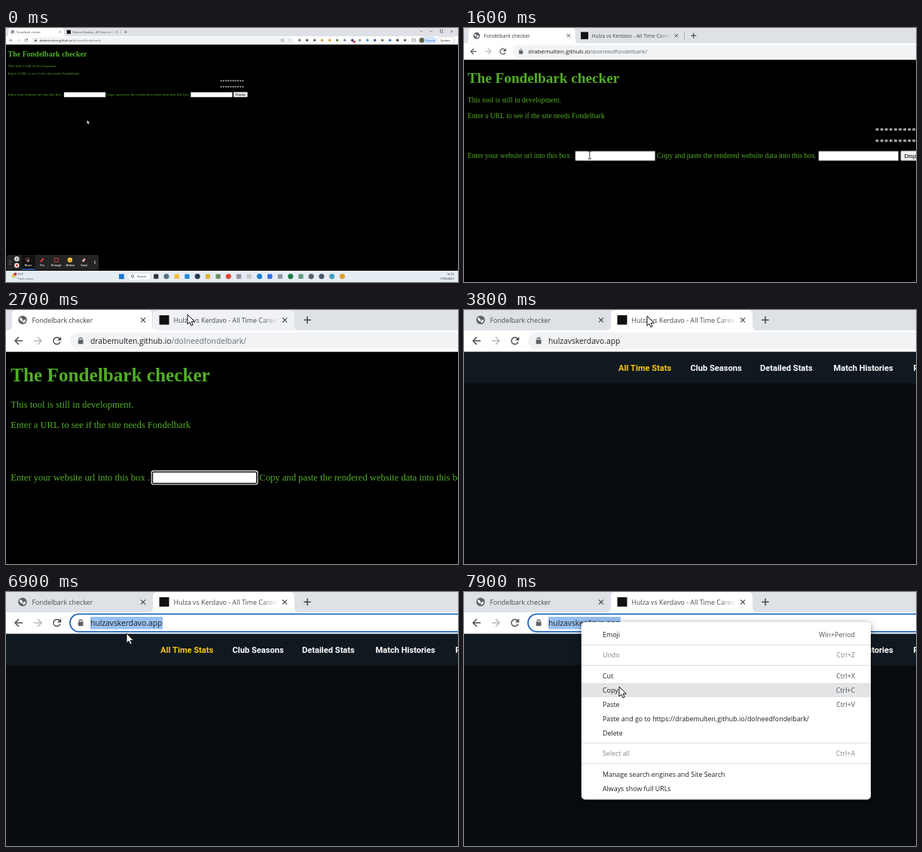
These frames come from a looping animation (600 px wide and 338 px high, 8 s). An HTML page with a canvas:

```html
<!DOCTYPE html>
<html lang="en">
<head>
<meta charset="utf-8">
<title>Fondelbark checker</title>
<style>
html, body { margin: 0; width: 100%; height: 100%; overflow: hidden; background: #000; }
canvas { display: block; width: 600px; height: 338px; }
</style>
</head>
<body>
<canvas id="stage" width="600" height="338"></canvas>
<script>
const ctx = document.getElementById('stage').getContext('2d');
const LOOP = 8000, ZOOM = 2.52;
// The desktop is laid out at its zoomed size; the camera shrinks it at first.
const W = 600 * ZOOM, H = 338 * ZOOM;
const UI = '"Open Sans", "Noto Sans", sans-serif';
const SERIF = '"Liberation Serif", "Times New Roman", serif';
const NAV = 'Roboto, "Open Sans", sans-serif';
const GREEN = '#52ae26', INK = '#202124', GREY = '#5f6368';
const HOST = 'drabemulten.github.io', PATH = '/doIneedfondelbark/', SITE = 'hulzavskerdavo.app';

const T = { focus: 1850, hover: 2500, swap: 3100, omni: 4900, menu: 7400 };

// Pointer path: time, x, y
const STOPS = [
  [300, 271, 309], [1300, 219, 222], [2000, 219, 222], [2600, 241, 6],
  [2700, 241, 6], [2950, 243, 8], [4000, 243, 8], [4700, 208, 43],
  [5300, 208, 43], [5500, 112, 43], [6100, 112, 43], [6800, 160, 55],
  [7050, 160, 55], [7300, 156, 41], [7450, 156, 41], [7800, 206, 126]
];

const clamp = v => Math.max(0, Math.min(1, v));
const smooth = v => { v = clamp(v); return v * v * (3 - 2 * v); };

function pointer(t) {
  let a = STOPS[0];
  for (const b of STOPS) {
    if (t < b[0]) {
      const raw = (t - a[0]) / (b[0] - a[0] || 1);
      const p = a[0] === 5300 ? clamp(raw) : smooth(raw);
      return { x: a[1] + (b[1] - a[1]) * p, y: a[2] + (b[2] - a[2]) * p };
    }
    a = b;
  }
  return { x: a[1], y: a[2] };
}

function rect(x, y, w, h, fill) {
  ctx.fillStyle = fill;
  ctx.fillRect(x, y, w, h);
}
function round(x, y, w, h, r, fill, stroke, width = 1) {
  ctx.beginPath();
  ctx.roundRect(x, y, w, h, r);
  if (fill) { ctx.fillStyle = fill; ctx.fill(); }
  if (stroke) { ctx.strokeStyle = stroke; ctx.lineWidth = width; ctx.stroke(); }
}
function dot(x, y, r, fill) {
  ctx.fillStyle = fill;
  ctx.beginPath();
  ctx.arc(x, y, r, 0, Math.PI * 2);
  ctx.fill();
}
function line(color, width, ...pts) {
  ctx.strokeStyle = color;
  ctx.lineWidth = width;
  ctx.beginPath();
  for (let i = 0; i < pts.length; i += 2) ctx.lineTo(pts[i], pts[i + 1]);
  ctx.stroke();
}
function text(s, x, y, size, color, family = UI, weight = 400, align = 'left') {
  ctx.font = `${weight} ${size}px ${family}`;
  ctx.textAlign = align;
  ctx.fillStyle = color;
  ctx.fillText(s, x, y);
}
function cross(x, y, r, color, width = 1.2) {
  line(color, width, x - r, y - r, x + r, y + r);
  line(color, width, x - r, y + r, x + r, y - r);
}

function tabShape(x, r, fill) {
  ctx.fillStyle = fill;
  ctx.beginPath();
  ctx.moveTo(x - 6, 27);
  ctx.quadraticCurveTo(x, 27, x, 21);
  ctx.lineTo(x, 6);
  ctx.quadraticCurveTo(x, 0, x + 6, 0);
  ctx.lineTo(r - 6, 0);
  ctx.quadraticCurveTo(r, 0, r, 6);
  ctx.lineTo(r, 21);
  ctx.quadraticCurveTo(r, 27, r + 6, 27);
  ctx.fill();
}

function globe(x, y) {
  dot(x, y, 5.7, GREY);
  ctx.fillStyle = '#fff';
  ctx.beginPath();
  ctx.ellipse(x - 1.8, y - .6, 1.5, 2.8, -.7, 0, 7);
  ctx.ellipse(x + 2.2, y + 1.6, 1.3, 2.4, .7, 0, 7);
  ctx.fill();
}

function tabs(t) {
  rect(0, 0, W, 27, '#dee1e6');
  const second = t >= T.swap;
  if (second) tabShape(195, 383, '#fff');
  else {
    if (t > T.hover) tabShape(195, 383, '#eff1f4');
    tabShape(8, 194, '#fff');
    if (t <= T.hover) line('#9aa0a6', 1, 384, 7, 384, 20);
  }
  globe(22, 13.3);
  text('Fondelbark checker', 34.5, 16.6, 8.85, second ? '#4a4d51' : '#3c4043');
  cross(182, 13.3, 3, '#45494d');
  rect(203.5, 7, 13, 12.5, '#111');
  const fade = ctx.createLinearGradient(338, 0, 362, 0);
  fade.addColorStop(0, '#45494d');
  fade.addColorStop(1, 'rgba(69,73,77,0)');
  ctx.save();
  ctx.beginPath();
  ctx.rect(220, 0, 141, 27);
  ctx.clip();
  text('Hulza vs Kerdavo - All Time Career Stats', 222.5, 16.6, 8.85, fade);
  ctx.restore();
  cross(370, 13.3, 3, '#45494d');
  line('#3c4043', 1.4, 395.3, 13.3, 404.7, 13.3);
  line('#3c4043', 1.4, 400, 8.6, 400, 18);
  line('#333', 1.2, 1385, 9, 1389, 13, 1393, 9);
  line('#333', 1.2, 1418, 11, 1426, 11);
  ctx.strokeRect(1453, 7, 8, 8);
  cross(1491, 11, 4, '#333');
}

function arrow(x, dir, color) {
  line(color, 1.5, x - 5 * dir, 41, x + 5 * dir, 41);
  line(color, 1.5, x, 36, x + 5 * dir, 41, x, 46);
}

function omnibox(t) {
  const focused = t >= T.omni, second = t >= T.swap;
  if (focused) round(85, 29.3, 878, 23.6, 11.8, '#fff', '#2167bd', 1.8);
  else round(85, 30, 878, 22, 11, '#f1f3f4');
  round(95.7, 39.5, 6.8, 5.8, .8, GREY);
  ctx.strokeStyle = GREY;
  ctx.lineWidth = 1.1;
  ctx.beginPath();
  ctx.arc(99.1, 39, 2.1, Math.PI, 0);
  ctx.stroke();
  if (!second) {
    text(HOST, 112, 44.8, 10.3, INK);
    text(PATH, 112 + ctx.measureText(HOST).width, 44.8, 10.3, '#6a6e73');
    return;
  }
  if (t >= 5300) {
    const left = t < 5600 ? pointer(t - 100).x : 112;
    if (left < 208) rect(left, 33, 208 - left, 16.5, '#98c1ef');
  }
  text(SITE, 112, 44.8, 10.3, INK);
}

const ICON_TINTS = ['#777', '#555', '#666', '#d69b4a', '#e09a28', '#5f8d4e', '#8a8f9c',
  '#2b4b9b', '#999', '#4a90d9', '#335c9c', '#777', '#4778c9', '#444', '#666'];

function toolbar(t) {
  rect(0, 27, W, 28.5, '#fff');
  arrow(17, -1, '#4b4e52');
  arrow(42, 1, '#b4b7ba');
  ctx.strokeStyle = '#4b4e52';
  ctx.lineWidth = 1.5;
  ctx.beginPath();
  ctx.arc(67.6, 41, 4.6, .35, 5.6);
  ctx.stroke();
  ctx.fillStyle = '#4b4e52';
  ctx.beginPath();
  ctx.moveTo(73.2, 35.4);
  ctx.lineTo(73.2, 40.6);
  ctx.lineTo(68, 40.6);
  ctx.fill();
  omnibox(t);
  ctx.strokeStyle = GREY;
  ctx.lineWidth = 1.2;
  ctx.strokeRect(921, 38, 8, 7);
  text('☆', 950, 45, 12, GREY, '"DejaVu Sans", sans-serif', 400, 'center');
  ICON_TINTS.forEach((c, i) => dot(982 + i * 25.2, 41, 4.3, c));
  rect(1160, 43, 9, 6, '#d63b3b');
  ctx.strokeStyle = '#444';
  ctx.strokeRect(1360, 36, 9, 9);
  round(1380, 30, 58, 22, 11, '#d5e5fb', '#a9c7f3');
  dot(1391, 41, 8, '#6d6244');
  text('Paused', 1403, 45, 9.6, '#1967d2');
  round(1443, 30, 58, 22, 11, '#fff', '#8e9399');
  text('Update', 1453, 45, 9.6, INK);
}

function checkerPage(t) {
  rect(0, 55.5, W, H, '#000');
  text('The Fondelbark checker', 6.3, 95.3, 25.2, GREEN, SERIF, 700);
  const say = (s, x, y) => text(s, x, y, 12.6, GREEN, SERIF);
  say('This tool is still in development.', 6.3, 130);
  say('Enter a URL to see if the site needs Fondelbark', 6.3, 157);
  for (let i = 0; i < 20; i++)
    text('*', 720 + i % 10 * 8, i < 10 ? 184 : 204, 14, '#d0d0d0', SERIF, 700, 'center');
  say('Enter your website url into this box .', 6.3, 227);
  if (t >= T.focus) {
    round(192.6, 213.6, 142, 19, 3, '#fff');
    round(194.4, 215.4, 138.4, 15.4, 1.5, '#fff', '#101010', 1.5);
  } else {
    round(194, 215.2, 139, 16.6, 1, '#fff', '#767676');
  }
  say('Copy and paste the rendered website data into this box.', 336.3, 227);
  round(618, 215.2, 139, 16.6, 1, '#fff', '#767676');
  round(761, 214.6, 47, 17, 2, '#efefef', '#767676');
  text('Display', 784.5, 226.8, 10.5, '#000', '"Liberation Sans", Arial, sans-serif', 400, 'center');
}

function statsPage() {
  rect(0, 55.5, W, H, '#080c0f');
  rect(0, 55.5, W, 42, '#101920');
  const items = [['All Time Stats', 205], ['Club Seasons', 300.5], ['Detailed Stats', 393],
    ['Match Histories', 490.5], ['Player Records', 596.5]];
  items.forEach(([s, x], i) => text(s, x, 81, 11.1, i ? '#fff' : '#fbc614', NAV, 700));
}

function recorder() {
  round(3, 761, 307, 51, 4, '#242424');
  for (let i = 0; i < 6; i++) dot(12 + i % 2 * 5, 780 + (i >> 1) * 6, 1.4, '#999');
  dot(36, 774, 8, '#f3f3f3');
  rect(33, 770, 2, 8, '#333');
  rect(37, 770, 2, 8, '#333');
  dot(36, 796, 8, '#f3f3f3');
  rect(32.5, 792.5, 7, 7, '#d93025');
  rect(52, 762, 45, 48, '#111');
  rect(52, 808, 45, 3, '#3b82f6');
  ctx.strokeStyle = '#e66';
  ctx.lineWidth = 1.5;
  ctx.beginPath();
  ctx.arc(72, 777, 6, 0, 7);
  ctx.stroke();
  arrowShape(72, 775, .7);
  line('#e53935', 5, 115, 784, 126, 773);
  ctx.strokeStyle = '#e53935';
  ctx.lineWidth = 2;
  ctx.strokeRect(162, 772, 13, 13);
  dot(214, 778, 8, '#f7c531');
  rect(210, 780, 8, 2, '#7a4b10');
  line('#e8a0a0', 7, 256, 783, 264, 774);
  ['Mouse', 'Pen', 'Rectangle', 'Medium', 'Eraser'].forEach((s, i) =>
    text(s, 74 + i * 47, 799, 7.4, '#fff', UI, 600, 'center'));
  line('#fff', 2, 300, 780, 295, 786, 300, 792);
}

const APP_TINTS = ['#333', '#5b7285', '#f3bd3e', '#2489d8', '#283b52', '#e0b13d', '#6a8f5d', '#e34b35',
  '#9c8fa0', '#c9c9c9', '#1681cf', '#2f6fe4', '#8f98a5', '#1e7d45', '#5d9b7c', '#59616a',
  '#4a5968', '#45a0bd', '#d9a12c', '#b5342d', '#2cab57'];

function taskbar() {
  rect(0, 814, W, 38, '#e6ecf4');
  dot(27, 831, 7, '#f2b632');
  dot(32, 834, 5, '#c8d3de');
  dot(31, 825, 5, '#c4314b');
  text('59°F', 39, 829, 9, '#222');
  text('Partly sunny', 39, 843, 9, '#555');
  rect(378, 825, 17, 17, '#1678d2');
  round(406, 822, 78, 23, 11.5, '#fbfcfe', '#cdd5df');
  ctx.strokeStyle = '#222';
  ctx.lineWidth = 1.5;
  ctx.beginPath();
  ctx.arc(423, 832, 4, 0, 7);
  ctx.stroke();
  line('#222', 1.5, 426, 835, 429, 838);
  text('Search', 438, 837, 10, '#333');
  const step = 34.6;
  APP_TINTS.slice(0, 19).forEach((c, i) => {
    const x = 502 + i * step;
    if (i % 3 === 1 || i > 14) dot(x, 833, 9, c);
    else round(x - 8, 825, 16, 16, 3, c);
  });
  text('16:16', 1498, 829, 9, '#222', UI, 400, 'right');
  text('17/05/2023', 1498, 843, 9, '#222', UI, 400, 'right');
}

const MENU = [
  ['Emoji', 57, 'Win+Period'], ['Undo', 84, 'Ctrl+Z', 1], ['Cut', 111.5, 'Ctrl+X'],
  ['Copy', 130.5, 'Ctrl+C'], ['Paste', 149.5, 'Ctrl+V'],
  ['Paste and go to https://' + HOST + PATH, 168.3], ['Delete', 187.3],
  ['Select all', 214.7, 'Ctrl+A', 1], ['Manage search engines and Site Search', 242.3],
  ['Always show full URLs', 261.3]
];

function menu(p) {
  ctx.save();
  ctx.shadowColor = 'rgba(0,0,0,.45)';
  ctx.shadowBlur = 9;
  ctx.shadowOffsetY = 2;
  round(155.8, 40, 384.2, 236.3, 5, '#fff');
  ctx.restore();
  for (const y of [70.5, 97.5, 201, 228.5]) rect(156, y - .5, 384, 1, '#dcdee1');
  for (const [label, y, keys, off] of MENU) {
    if (!off && p.x > 157 && Math.abs(p.y - y) < 9.5) rect(156, y - 9.5, 384, 19, '#e2e4e5');
    const ink = off ? '#85888c' : INK;
    text(label, 184, y + 3.2, 8.85, ink);
    if (keys) text(keys, 519, y + 3.2, 8.85, off ? ink : '#4f5256', UI, 400, 'right');
  }
}

function arrowShape(x, y, s = 1) {
  ctx.save();
  ctx.translate(x, y);
  ctx.scale(s, s);
  ctx.beginPath();
  const pts = [0, 0, 0, 13, 3, 10.2, 5, 14.8, 7.2, 13.8, 5.2, 9.3, 9.3, 9.3];
  for (let i = 0; i < pts.length; i += 2) ctx.lineTo(pts[i], pts[i + 1]);
  ctx.closePath();
  ctx.fillStyle = '#fff';
  ctx.fill();
  ctx.strokeStyle = '#111';
  ctx.lineWidth = 1;
  ctx.stroke();
  ctx.restore();
}

function beam(x, y, color) {
  line(color, 1.2, x, y - 6, x, y + 6);
  line(color, 1.2, x - 2.7, y - 6.5, x + 2.7, y - 6.5);
  line(color, 1.2, x - 2.7, y + 6.5, x + 2.7, y + 6.5);
}

function cursor(t, p) {
  const onBox = t < T.swap && p.y > 214 && p.y < 233 && p.x > 193 && p.x < 334;
  const onUrl = p.y > 30 && p.y < 52 && p.x > 105 && t < T.menu;
  if (onBox || onUrl) beam(p.x, p.y, '#222');
  else arrowShape(p.x, p.y);
}

function draw(t) {
  const cam = (1 + (ZOOM - 1) * smooth((t - 1330) / 475)) / ZOOM;
  ctx.setTransform(cam, 0, 0, cam, 0, 0);
  const p = pointer(t);
  if (t < T.swap) checkerPage(t);
  else statsPage();
  tabs(t);
  toolbar(t);
  if (cam < .99) {
    recorder();
    taskbar();
  }
  if (t >= T.menu) menu(p);
  cursor(t, p);
}

const start = performance.now();
function tick() {
  draw((performance.now() - start) % LOOP);
  requestAnimationFrame(tick);
}
tick();
</script>
</body>
</html>
```
